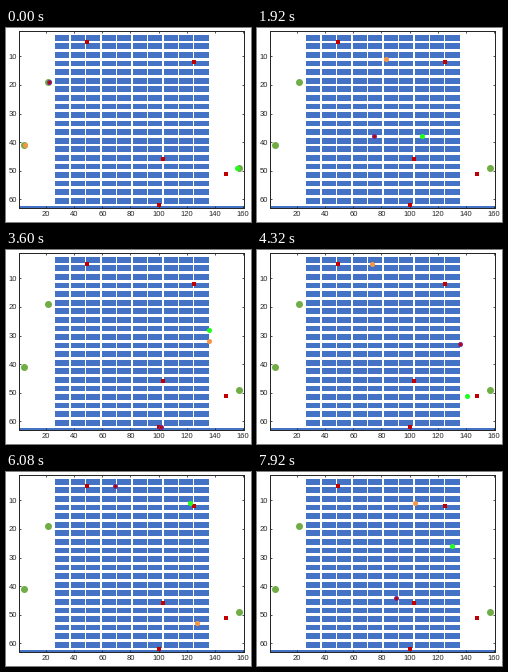
Write a matplotlib script that moves like this. It is 245 px wide and 194 px high and loops after 8 s.

```python
import math

import numpy as np
import matplotlib.pyplot as plt
from matplotlib.animation import FuncAnimation
from matplotlib.patches import Rectangle

W, H, DPI = 245, 194, 100
FRAMES, INTERVAL = 100, 80
PX = 72 / DPI
BLUE, RED, HOME, INK = "#4472c4", "#c00000", "#70ad47", "#262626"

# The floor: racks of 10 x 2 cells with one-cell aisles between them
GATE0, GATE_STEP, GATES = 26, 11, 11
OPEN_X = GATE0 + GATE_STEP * (GATES - 1)
PICKS = {"A": (49, 5), "B": (125, 12), "C": (103, 46), "D": (148, 51), "E": (100, 62)}
EXIT_ROW = {"A": 11, "B": 26, "C": 38, "E": 44}  # usual cross aisle out of a pick

# Each robot: home, colour, edge, and its stops in order with the tick of
# arrival at the last stop of each group
ROBOTS = [
    ((4, 41), "#f79646", "#f79646",
     [("C", 10.3), ("A", 19.9), ("B", 28.4), ("EDA", 56.4), ("BEDA", 92.9), ("B", 101.2)]),
    ((157, 49), "#1fff1f", "#1fff1f",
     [("CE", 10.1), ("D", 16), ("CB", 29.3), ("D", 35.5), ("D", 41.5), ("B", 47.7),
      ("DA", 66.7), ("BCD", 89), ("B", 97.1), ("D", 103.3)]),
    ((21, 19), RED, "#7030a0",
     [("B", 11), ("E", 18.5), ("C", 20.4), ("A", 29.9), ("B", 38.2), ("E", 45.2),
      ("DBD", 63.2), ("A", 78), ("E", 91.1), ("A", 121.6)]),
]


def gate(x, toward):
    """Nearest vertical aisle on the way to another column."""
    k = (x - GATE0) / GATE_STEP
    k = math.ceil(k) if toward > x else math.floor(k)
    return GATE0 + GATE_STEP * min(max(k, 0), GATES - 1)


def aisle(y, origin):
    """Horizontal aisle next to row y, on the side it is reached from."""
    k = (y - 2) / 3
    return 2 + 3 * (math.floor(k) if origin < y else math.ceil(k))


def leg(a, b, name):
    """Corners from a to b: out to a gate, across one aisle, in by a gate."""
    if a == b:
        return [b]
    (ax_, ay), (bx, by) = a, b
    row = EXIT_ROW.get(name, -1)
    if not min(ay, by) < row < max(ay, by):
        row = aisle(by, ay)
    leave = gate(ax_, bx)
    enter = bx if bx > OPEN_X else gate(bx, ax_)
    return [(leave, ay), (leave, row), (enter, row), (enter, by), b]


def walk(home, tour):
    """Cell at every tick, at steady speed between the timed stops."""
    corners, name = [home], ""
    ticks, timed = [-0.1], [0]
    for stops, tick in tour:
        for stop in stops:
            corners += leg(corners[-1], PICKS[stop], name)
            name = stop
        ticks.append(tick)
        timed.append(len(corners) - 1)
    pts = np.array(corners, float)
    dist = np.r_[0, np.abs(np.diff(pts, axis=0)).sum(axis=1).cumsum()]
    s = np.interp(np.arange(FRAMES), ticks, dist[timed])
    return np.round(np.c_[np.interp(s, dist, pts[:, 0]), np.interp(s, dist, pts[:, 1])])


fig = plt.figure(figsize=(W / DPI, H / DPI), dpi=DPI, facecolor="white")
ax = fig.add_axes([13.4 / W, 1 - 179.9 / H, 225 / W, 177.3 / H])
ax.set(xlim=(1, 161), ylim=(63, 1), xticks=range(20, 161, 20), yticks=range(10, 61, 10))
ax.tick_params(direction="in", length=2 * PX, width=0.8 * PX, top=True, right=True,
               color=INK, labelcolor=INK, labelsize=7.6 * PX,
               labelfontfamily="Liberation Sans")
ax.tick_params(axis="x", pad=3.5 * PX)
ax.tick_params(axis="y", pad=2.5 * PX)
for spine in ax.spines.values():
    spine.set(linewidth=PX, color=INK)


def block(x, y, w, h):
    ax.add_patch(Rectangle((x - 0.5, y - 0.5), w, h, fc=BLUE, lw=0))


def dots(cells, marker, size, color, z, edge="none", edge_width=0):
    return ax.plot(*zip(*cells), marker, ms=size * PX, mfc=color, mec=edge,
                   mew=edge_width * PX, zorder=z, clip_on=False)[0]


for y in range(3, 61, 3):
    for x in range(GATE0 + 1, OPEN_X, GATE_STEP):
        block(x, y, GATE_STEP - 1, 2)
for y in (1, 63):
    block(1, y, 161, 1)
for x in (1, 161):
    block(x, 1, 1, 63)

dots([home for home, *_ in ROBOTS], "o", 7, HOME, 3)
dots(PICKS.values(), "s", 4, RED, 5)
movers = [(dots([home], "o", 4, color, 6, edge, 1), walk(home, tour))
          for home, color, edge, tour in ROBOTS]


def update(i):
    for dot, path in movers:
        dot.set_data([path[i, 0]], [path[i, 1]])
    return [dot for dot, _ in movers]


anim = FuncAnimation(fig, update, frames=FRAMES, interval=INTERVAL, repeat=True,
                     repeat_delay=0, blit=False)
plt.show()
```
